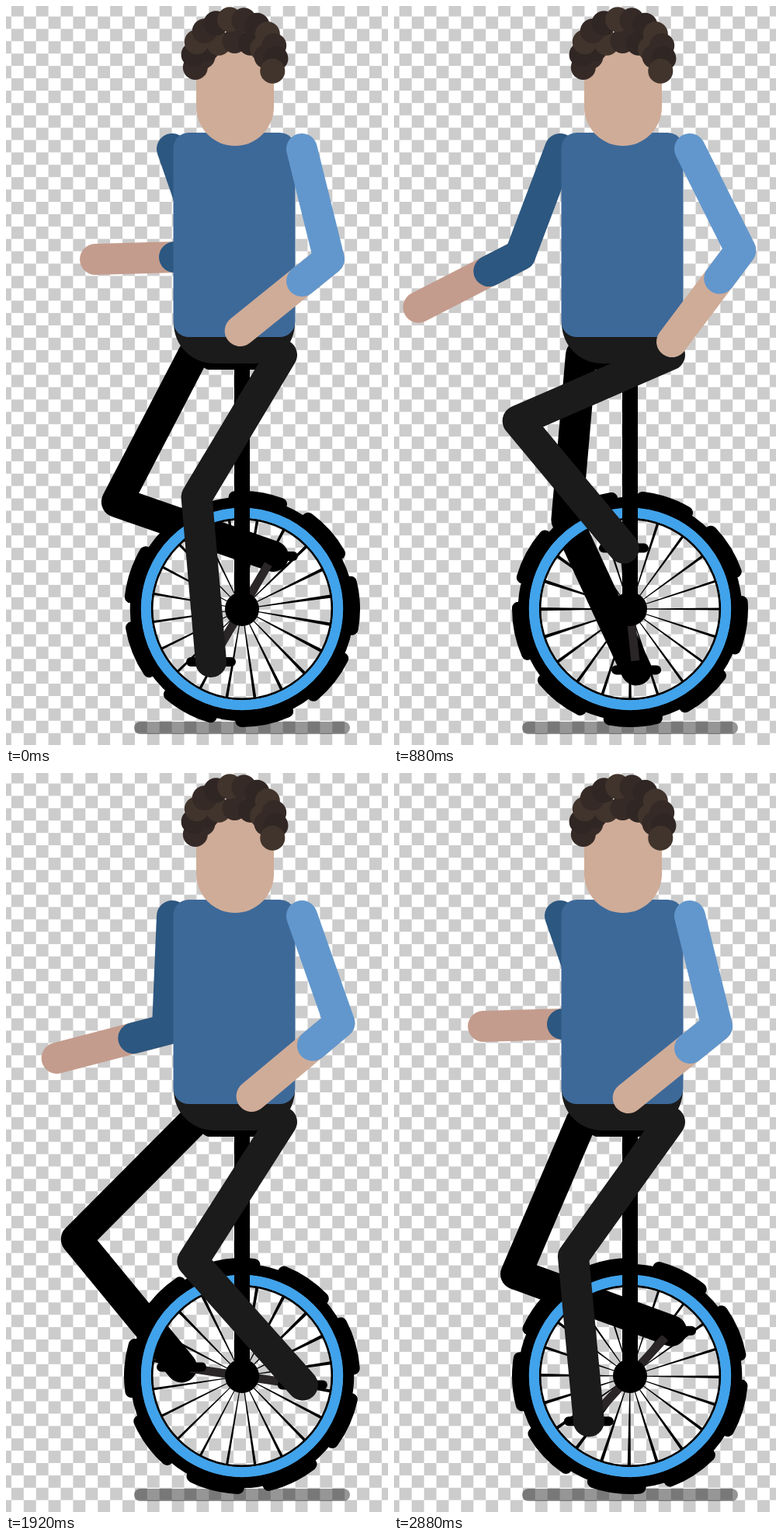
An HTML page for the animation above (2920 ms loop, 492x951 px).

```html
<!DOCTYPE html>
<html lang="en">
<head>
<meta charset="utf-8">
<title>Unicycle rider</title>
<style>
  html, body { margin: 0; width: 100%; height: 100%; overflow: hidden; background: #fff; }
  svg { display: block; width: 492px; height: 951px; }
  .limb { fill: none; stroke-width: 40; stroke-linecap: round; stroke-linejoin: round; }
  .crank { stroke: #2a2526; stroke-width: 11; }
  .pedal { stroke: #000; stroke-width: 12; stroke-linecap: round; }
</style>
</head>
<body>
<svg viewBox="0 0 492 951">
  <defs>
    <pattern id="checker" x="6.9" y="13.5" width="31.8" height="31.8" patternUnits="userSpaceOnUse">
      <path d="M15.9 0h15.9v15.9h-15.9zM0 15.9h15.9v15.9h-15.9z" fill="#ccc" shape-rendering="crispEdges"/>
    </pattern>
  </defs>
  <rect width="492" height="951" fill="#fff"/>
  <rect width="492" height="951" fill="url(#checker)"/>
  <rect x="165" y="921" width="278" height="16" rx="8" fill="#000" fill-opacity=".41"/>

  <path id="farSkin" class="limb" stroke="#c49c8d"/>
  <path id="farSleeve" class="limb" stroke="#2c5780"/>
  <path id="farLeg" class="limb" stroke="#000"/>

  <g transform="translate(304 776)">
    <g id="wheel">
      <circle r="137" fill="none" stroke="#000" stroke-width="14.5"/>
      <circle r="144" fill="none" stroke="#000" stroke-width="16" stroke-linecap="round"
        pathLength="360" stroke-dasharray="24.1 15.9" transform="rotate(26.2)"/>
      <path id="spokes" transform="rotate(9.8)"/>
    </g>
    <circle r="116" fill="none" stroke="#000" stroke-width="3"/>
    <circle r="123.7" fill="none" stroke="#40a3eb" stroke-width="13"/>
    <path id="cranks" class="crank"/>
    <path id="farPedal" class="pedal"/>
    <path id="nearPedal" class="pedal"/>
    <circle r="22"/>
  </g>

  <rect x="294" y="455" width="20" height="321"/>
  <rect x="250" y="440" width="90" height="28" rx="13"/>
  <path d="M216 400H372V408A52 52 0 0 1 320 460H268A52 52 0 0 1 216 408Z" fill="#1b1b1b"/>
  <path id="nearLeg" class="limb" stroke="#1b1b1b"/>
  <rect x="215.5" y="163" width="157" height="263" rx="20" fill="#3d6999"/>
  <path d="M245 50H345V130A50 50 0 0 1 245 130Z" fill="#cfac98"/>
  <g id="hair"></g>
  <path id="nearSkin" class="limb" stroke="#cfac98"/>
  <path id="nearSleeve" class="limb" stroke="#6297cd"/>
</svg>
<script>
const LOOP = 2920, STEP = 40;
const CRANK = 78.8, LEG = 213, UPPER_ARM = 146, FOREARM = 147, CUFF = 45;
const CRANK_SPEED = 0.24586, WHEEL_SPEED = 0.2157; // degrees per ms
const rad = Math.PI / 180;
const $ = id => document.getElementById(id);
const draw = (id, d) => $(id).setAttribute('d', d);
const line = pts => 'M' + pts.map(p => p.map(v => v.toFixed(2)).join(' ')).join('L');
const mix = (a, b, u) => a + (b - a) * u;
const ease = u => (1 - Math.cos(Math.PI * u)) / 2;

// Arm swings between turning points: [time, shoulder angle, elbow bend]
const farSwing = [[0, 19.2], [800, -21.6], [1500, 6.2], [2140, -5.5], [2880, 19.2]];
const nearSwing = [[0, 13.9, 65], [440, .3, 36.5], [1000, 29.8, 66.8],
  [1640, 13.1, 57.8], [2470, 37.6, 103.6], [2880, 13.9, 65]];

function swing(keys, t) {
  const i = keys.findIndex(k => k[0] >= t && k[0] > 0);
  const a = keys[i - 1], b = keys[i];
  const u = ease((t - a[0]) / (b[0] - a[0]));
  return a.slice(1).map((v, n) => mix(v, b[n + 1], u));
}

// The far hand drops smoothly, then rises at a steady rate
function farForearm(t) {
  const high = 88.4, low = 62.4, turn = 960;
  return t < turn ? mix(high, low, ease(t / turn)) : mix(low, high, (t - turn) / (2880 - turn));
}

function arm(name, shoulder, upper, fore) {
  const elbow = [shoulder[0] + UPPER_ARM * Math.sin(upper * rad), shoulder[1] + UPPER_ARM * Math.cos(upper * rad)];
  const reach = n => [elbow[0] - n * Math.sin(fore * rad), elbow[1] + n * Math.cos(fore * rad)];
  draw(name + 'Skin', line([elbow, reach(FOREARM)]));
  draw(name + 'Sleeve', line([shoulder, elbow, reach(CUFF)]));
}

// Two equal bones from hip to pedal, knee pointing forwards
function leg(name, hip, pedal) {
  const foot = [304 + pedal[0], 776 + pedal[1]];
  const dx = foot[0] - hip[0], dy = foot[1] - hip[1], d = Math.hypot(dx, dy);
  const h = Math.sqrt(LEG * LEG - d * d / 4) / d;
  const knee = [hip[0] + dx / 2 - dy * h, hip[1] + dy / 2 + dx * h];
  draw(name + 'Leg', line([hip, knee, foot]));
  draw(name + 'Pedal', line([[pedal[0] - 26, pedal[1]], [pedal[0] + 26, pedal[1]]]));
}

function render(t) {
  const turn = (120.47 - CRANK_SPEED * t) * rad;
  const near = [CRANK * Math.cos(turn), CRANK * Math.sin(turn)];
  const far = near.map(v => -v);
  $('wheel').setAttribute('transform', `rotate(${-WHEEL_SPEED * t})`);
  draw('cranks', line([far.map(v => v * .85), near]));
  leg('far', [241, 449], far);
  leg('near', [355, 449], near);
  arm('far', [214, 184], swing(farSwing, t)[0], farForearm(t));
  const [upper, bend] = swing(nearSwing, t);
  arm('near', [381, 184], upper, bend - upper);
}

// Spokes widen from hub to rim, a little more on one side of the wheel
function buildSpokes() {
  let d = '';
  for (let a = 0; a < 360; a += 18) {
    const c = Math.cos(a * rad), s = Math.sin(a * rad), w = 1.8 + .3 * c;
    const polar = (r, side) => [r * c - side * s, r * s + side * c];
    d += line([polar(10, -.4), polar(115, -w), polar(115, w), polar(10, .4)]) + 'Z';
  }
  draw('spokes', d);
}

// A row of curls along an arch over the head
function curls(count, rx, ry, from, to) {
  const shades = ['#362a27', '#41342c', '#302623'];
  for (let i = 0; i < count; i++) {
    const a = mix(from, to, i / (count - 1)) * rad;
    const x = 294.5 + rx * Math.cos(a), y = 65 + ry * Math.sin(a);
    $('hair').innerHTML += `<circle cx="${x}" cy="${y}" r="16" fill="${shades[i * 2 % 3]}"/>`;
  }
}

buildSpokes();
curls(7, 41, 20, 180, 360);
curls(12, 53, 48, 163, 383);

const start = performance.now();
function tick() {
  const t = (performance.now() - start) % LOOP;
  render(Math.floor(t / STEP) * STEP);
  requestAnimationFrame(tick);
}
tick();
</script>
</body>
</html>
```
